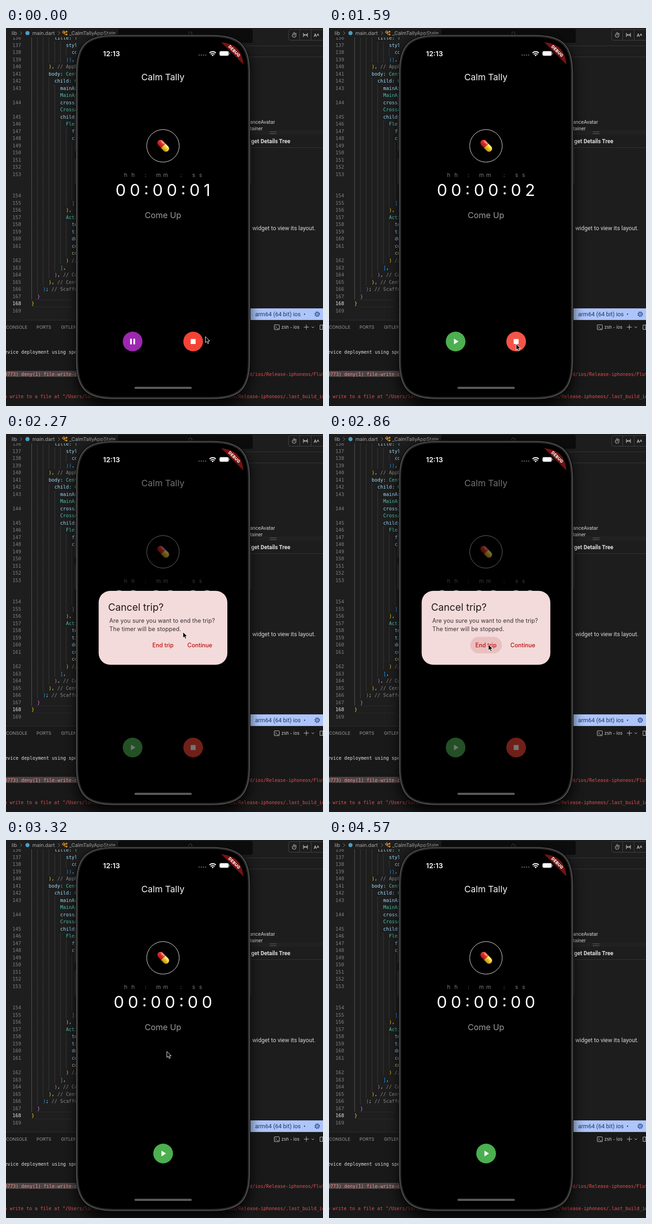
Write an HTML page that moves like this. It is 686 px wide and 817 px high and loops after 4630 ms.

```html
<!DOCTYPE html>
<html lang="en">
<head>
<meta charset="utf-8">
<title>Trip timer</title>
<style>
  html, body { margin: 0; width: 100%; height: 100%; overflow: hidden; background: #1e1e1e; }
  svg { display: block; width: 686px; height: 817px; }
  text { white-space: pre; font-family: Inter, "Open Sans", sans-serif; }
  .mono text { font-family: "DejaVu Sans Mono", monospace; }
  .rob text { font-family: Roboto, sans-serif; }
  .mid { text-anchor: middle; }
  .line { fill: none; stroke-linecap: round; stroke-linejoin: round; }
  #clock { font-feature-settings: "calt" 1; }
</style>
</head>
<body>
<svg viewBox="0 0 686 817" xmlns="http://www.w3.org/2000/svg">
  <defs>
    <filter id="soft" x="-20%" y="-20%" width="140%" height="140%"><feGaussianBlur stdDeviation="13"/></filter>
    <clipPath id="editor"><rect y="20" width="152" height="610"/></clipPath>
    <clipPath id="screen"><path id="glass"/></clipPath>
    <clipPath id="list"><rect x="520" y="190" width="166" height="31"/></clipPath>
    <linearGradient id="red" x2="0" y2="1"><stop stop-color="#ff8a70"/><stop offset=".35" stop-color="#e8372c"/><stop offset="1" stop-color="#a81414"/></linearGradient>
    <linearGradient id="gold" x2="0" y2="1"><stop stop-color="#fff08a"/><stop offset=".4" stop-color="#f3cf32"/><stop offset="1" stop-color="#b98d10"/></linearGradient>
    <path id="play" d="M8 5v14l11-7z"/>
    <path id="pause" d="M6 19h4V5H6zM14 5v14h4V5z"/>
    <path id="stop" d="M6 6h12v12H6z"/>
  </defs>

  <!-- editor -->
  <rect width="686" height="817" fill="#1e1e1e"/>
  <g id="code" class="mono" font-size="10.33" clip-path="url(#editor)"></g>
  <g font-size="10.9" fill="#a9a9a9">
    <text x="12" y="15">lib</text>
    <text x="57" y="15">main.dart</text>
    <text x="137" y="15">_CalmTallyAppState</text>
    <path class="line" stroke="#8a8a8a" d="M31 7.5l3.5 3.5-3.5 3.5M113 7.5l3.5 3.5-3.5 3.5"/>
    <circle cx="46.5" cy="11" r="4.5" fill="#4b9cc4"/>
    <path class="line" stroke="#ee9d28" stroke-width="1.2" d="M122 9l3-3 2.5 2.5-3 3zM126 9.5h3M127 9.5v4.5h2M129.5 8l1.5-1.5 1.5 1.5-1.5 1.5zM129.5 14l1.5-1.5 1.5 1.5-1.5 1.5z"/>
  </g>

  <!-- inspector -->
  <g class="rob">
    <rect x="520" width="166" height="606" fill="#1d1d1d"/>
    <path class="line" stroke="#363636" d="M520 38.5H686M520 62.5H686M520 258.5H686"/>
    <rect x="520" y="221" width="166" height="10" fill="#212121"/>
    <path class="line" stroke="#666" d="M571 224.5h14M571 228.5h14"/>
    <rect x="611.5" y="3.5" width="90" height="23" rx="4" fill="none" stroke="#454545"/>
    <path stroke="#454545" d="M635.5 4v22M660.5 4v22"/>
    <g class="line" stroke="#c4c4c4" stroke-width="1.2">
      <circle cx="623.5" cy="16" r="4"/><path d="M622 10h3M623.5 13.5v2.5M627 11.5l1 1"/>
      <path d="M643.5 11v8M652.5 11v8M645.5 15h5M646.5 13.5l-1.5 1.5 1.5 1.5M649.5 13.5l1.5 1.5-1.5 1.5"/>
    </g>
    <text x="666" y="18.5" font-size="9.5" font-weight="700" fill="#c4c4c4">A<tspan font-size="7.5" dy="-2">A</tspan></text>
    <g clip-path="url(#list)" font-size="10.8" fill="#d6d6d6">
      <text x="528" y="206.5">anceAvatar</text>
      <text x="528" y="221">tainer</text>
    </g>
    <text x="530.5" y="248.5" font-size="12" font-weight="700" fill="#dedede">get Details Tree</text>
    <text x="523" y="436.5" font-size="12.55" fill="#d8d8d8">a widget to view its layout.</text>
    <rect x="520" y="606" width="166" height="25" fill="#adc5fa"/>
    <text x="539" y="623" font-size="12.5" fill="#1e3562">arm64 (64 bit) ios  •</text>
    <g fill="none" stroke="#274b8c">
      <circle cx="673.5" cy="618.5" r="4.8" stroke-width="2.2" stroke-dasharray="2 1.77"/>
      <circle cx="673.5" cy="618.5" r="3.7" stroke-width="1.2"/><circle cx="673.5" cy="618.5" r="1.3"/>
    </g>
  </g>

  <!-- terminal -->
  <rect y="631" width="686" height="186" fill="#191919"/>
  <path stroke="#2e2e2e" d="M0 631.5H686"/>
  <g font-size="9.6" fill="#9a9a9a">
    <text x="0" y="650">CONSOLE</text><text x="66" y="650">PORTS</text><text x="119" y="650">GITLENS</text>
    <text x="596" y="650" fill="#d0d0d0">zsh - ios</text>
  </g>
  <g class="line" stroke="#c8c8c8">
    <rect x="580.5" y="641.5" width="11" height="10.5" rx="1"/><path d="M583 644.5l2.5 2.5-2.5 2.5M587 650h2.5"/>
    <path d="M645 646.5h10M650 641.5v10M661.5 645.5l2.5 2.5 2.5-2.5M690 642h-10.5v9.5h10.5M685 642v9"/>
  </g>
  <g class="mono" font-size="10" fill="#e5504f">
    <text x="-3" y="703.5" fill="#e2e2e2">evice deployment using spe</text>
    <rect y="741" width="160" height="13" fill="#4b4344"/>
    <text x="-3" y="751.5" fill="#f2928f">0773) deny(1) file-write-cr</text>
    <text x="527" y="751.5">d/ios/Release-iphoneos/Flut</text>
    <text x="-4" y="799.5">o write to a file at "/Users/lorkin/</text>
    <text x="479" y="799.5">ios/Release-iphoneos/.last_build_id</text>
  </g>

  <!-- phone -->
  <rect x="152" y="20" width="376" height="802" rx="66" opacity=".75" filter="url(#soft)"/>
  <rect x="243" y="2" width="291" height="30" rx="4" fill="#080808" opacity=".8"/>
  <circle class="line" cx="399" cy="12" r="3.5" stroke="#555" stroke-dasharray="2 1.2"/>
  <path stroke="#2c2c2c" stroke-width="3" d="M150.5 146v22M150.5 192v74M150.5 282v54M528.5 240v96"/>
  <path id="edge" stroke="#090909" stroke-width="2"/>
  <path id="rim" fill="#000" stroke="#2b2b2b" stroke-width="4"/>
  <path id="shine" fill="none" stroke="#686868" stroke-width="1.2"/>

  <g clip-path="url(#screen)">
    <text class="mid" x="339.5" y="113" font-size="19.2" fill="#f4f4f4">Calm Tally</text>
    <circle cx="339.7" cy="254.7" r="35.2" fill="none" stroke="#f0f0f0"/>
    <g transform="translate(340.3 254.6) rotate(46)">
      <path fill="url(#red)" d="M0-6.8H-8.5a6.8 6.8 0 0 0 0 13.6H0z"/>
      <path fill="url(#gold)" d="M0-6.8H8.5a6.8 6.8 0 0 1 0 13.6H0z"/>
      <path class="line" stroke="#fff" stroke-width="1.6" opacity=".55" d="M-9-3.8h6M3-3.8h6"/>
    </g>
    <text class="mid" y="321.5" x="259 275 302 330 345.5 379 406 421" font-size="11.8" fill="#7d7d7d">hh:mm:ss</text>
    <text id="clock" class="mid" x="343.8" y="363.2" font-size="35.6" letter-spacing="8.3" fill="#fff"></text>
    <text class="mid" x="339.7" y="410.7" font-size="17.8" fill="#9c9c9c">Come Up</text>
    <g id="left"><circle r="21.3"/><circle class="glow" r="21.3" fill="#fff"/><use transform="scale(.889) translate(-12 -12)" fill="#fff"/></g>
    <g id="right"><circle r="21.3" fill="#f44336"/><circle class="glow" r="21.3" fill="#fff"/><use href="#stop" transform="scale(.889) translate(-12 -12)" fill="#fff"/></g>
    <rect id="shade" x="160" y="25" width="360" height="770"/>
    <g id="dialog">
      <rect x="200.5" y="339" width="278.5" height="159.7" rx="25" fill="#f3dadb"/>
      <text x="221" y="382" font-size="21.3" fill="#211a1a">Cancel trip?</text>
      <g font-size="12.45" letter-spacing=".13" fill="#3a3031">
        <text x="223.5" y="408">Are you sure you want to end the trip?</text>
        <text x="223.5" y="425.5">The timer will be stopped.</text>
      </g>
      <rect id="hover" x="306" y="438.5" width="68" height="35.5" rx="17.75" fill="#a00c0c"/>
      <g class="mid" font-size="12.45" font-weight="500" fill="#bd100d">
        <text x="339.7" y="461">End trip</text>
        <text x="419.5" y="461">Continue</text>
      </g>
    </g>
    <path fill="#741313" d="M465 30h21l28.5 28.5v21z"/>
    <text class="mid" transform="translate(494.3 49.7) rotate(45)" y="3.3" font-size="8.8" font-weight="800" letter-spacing=".3" fill="#fff">DEBUG</text>
  </g>

  <!-- status bar -->
  <text x="210" y="60.5" font-size="15.1" font-weight="600" fill="#fff">12:13</text>
  <path class="line" stroke="#555" stroke-width="3" stroke-dasharray="0 4.7" d="M418 58.5h15"/>
  <path fill="none" stroke="#fff" stroke-width="2.2" d="M440.5 54a9.5 9.5 0 0 1 13.5 0M443 57a6 6 0 0 1 8.5 0"/>
  <path fill="#fff" d="M447.2 61.2l-2.2-2.4a3.2 3.2 0 0 1 4.4 0z"/>
  <rect x="462" y="50" width="20" height="10" rx="3" fill="#fff" stroke="#777" stroke-width=".8"/>
  <path class="line" stroke="#888" stroke-width="1.4" d="M484 53.5v3"/>
  <rect x="278" y="775.5" width="124" height="4.4" rx="2.2" fill="#5c5c5c"/>

  <path id="cursor" fill="#000" stroke="#fff" stroke-linejoin="round" d="M0 0V13l3-2.8 2.1 4.9 2.3-1-2-4.7h4.1z"/>
</svg>

<script>
const $ = id => document.getElementById(id);
const LOOP = 4630;

// Rectangle with smooth, continuous corners
function slab(id, x, y, w, h, r) {
  const L = 1.3 * r, c = .348 * r, d = L - c;
  $(id).setAttribute('d', `M${x} ${y + L}c0-${d} ${c}-${L} ${L}-${L}h${w - 2 * L}c${d} 0 ${L} ${c} ${L} ${L}` +
    `v${h - 2 * L}c0 ${d}-${c} ${L}-${L} ${L}h-${w - 2 * L}c-${d} 0-${L}-${c}-${L}-${L}z`);
}
slab('edge', 151.5, 15, 376.5, 787, 63);
slab('rim', 154, 17.5, 371.5, 782, 60.5);
slab('shine', 152.5, 16, 374.5, 785, 62);
slab('glass', 165, 30, 349.5, 758, 49);

// Each row: line number, indent level, then colour-keyed pieces
const ink = { p: '#9cdcfe', t: '#4ec9b0', y: '#ffd700', m: '#da70d6', b: '#179fff', c: '#8b8b8b', w: '#d4d4d4', f: '#dcdcaa' };
const rows = `136 4 ptitle:|t Text|b(
137 6 pstyle:|t Te
138 7 pcolor
139 6 b))|w,
140 3 y)|w,|c // AppBar
141 3 pbody:|t Center
142 4 pchild:|t Col
143 5 pmainAxis
- 5 tMainAxis
144 5 pcrossAx
- 5 tCrossAx
145 5 pchildren
146 6 tFlex
147 7 pfl
148 7 pch
149 8
150 8
151 8
152 8
153 8
- 8
- 8
154 8
155 7 b]
156 6 y)|w,
157 6 tActi
158 7 pte
159 7 pti
160 7 pdu
161 7 pco
- 7 fco
162 6 y)|c // A
163 5 b]|w,
164 4 m)|w,|c // Col
165 3 y)|w,|c // Center
166 2 b)|w;|c // Scaffold
167 1 m}
168 0 y}
169 0`.split('\n');

function codeRow(row, i) {
  const [, num, level, body] = row.match(/^(\S+) (\d) ?(.*)$/);
  const mid = 37 + 15.51 * (i - 1), base = mid + 3.7;
  let out = '';
  for (let k = 0; k < level; k++) {
    const x = 55.5 + 12.45 * k;
    out += `<path stroke="${k ? '#3b3b3b' : '#5a5a5a'}" d="M${x} ${mid - 7.8}v15.6"/>`;
  }
  if (num === '168') out += `<path stroke="#2d2d2d" d="M62 ${mid - 7.5}h80M62 ${mid + 7.5}h80"/>`;
  if (num !== '-') out += `<text x="14" y="${base}" fill="${num === '168' ? '#e8e8e8' : '#7e8084'}">${num}</text>`;
  const parts = body ? body.split('|').map(s => `<tspan fill="${ink[s[0]]}">${s.slice(1)}</tspan>`) : [];
  return out + `<text x="${55 + 12.45 * level}" y="${base}">${parts.join('')}</text>`;
}
$('code').innerHTML = rows.map(codeRow).join('');

// Pointer path: time, x, y
const path = [
  [0, 431.5, 667], [80, 431.5, 667], [540, 274, 682], [820, 272.5, 680.5], [960, 272.5, 680.5],
  [1120, 362, 681], [1280, 405, 683], [1700, 405, 683], [2210, 410, 424], [2270, 383, 428],
  [2480, 345, 455], [3300, 345, 455], [3320, 348, 457], [3460, 500, 774], [3640, 512, 800], [3700, 516, 835]
];

const ramp = (t, a, b) => Math.min(1, Math.max(0, (t - a) / (b - a)));
const smooth = k => k * k * (3 - 2 * k);

function pointer(t) {
  const i = path.findIndex(p => p[0] > t);
  if (i < 0) return [-50, -50];
  const [a, x, y] = path[i - 1], [b, u, v] = path[i];
  const k = smooth(ramp(t, a, b));
  return [x + (u - x) * k, y + (v - y) * k];
}

// Hover light plus a short press flash
function glow(t, from, to, press) {
  const hover = .05 * (ramp(t, from, from + 60) - ramp(t, to, to + 60));
  return hover + .06 * (ramp(t, press, press + 80) - ramp(t, press + 180, press + 380));
}

function place(id, x, light) {
  $(id).setAttribute('transform', `translate(${x} 677.6)`);
  $(id).querySelector('.glow').setAttribute('opacity', light);
}

function draw(t) {
  const ended = t >= 2870, paused = t >= 690;
  $('clock').textContent = '00:00:0' + (ended ? 0 : t < 330 ? 1 : 2);

  place('left', ended ? 340 : 274, ended ? 0 : glow(t, 490, 990, 660));
  place('right', 405, glow(t, 1200, 1720, 1540));
  $('left').firstElementChild.setAttribute('fill', paused ? '#4caf50' : '#9c27b0');
  $('left').querySelector('use').setAttribute('href', paused ? '#play' : '#pause');
  $('right').style.display = ended ? 'none' : '';

  const show = ramp(t, 1640, 1730), hide = ramp(t, 2940, 3050);
  $('shade').setAttribute('opacity', .54 * show * (1 - hide ** 1.6));
  $('dialog').setAttribute('opacity', show * (1 - hide));
  $('hover').setAttribute('opacity', .19 * ramp(t, 2780, 2900));

  $('cursor').setAttribute('transform', `translate(${pointer(t)})`);
}

const start = performance.now();
function tick() {
  draw((performance.now() - start) % LOOP);
  requestAnimationFrame(tick);
}
tick();
</script>
</body>
</html>
```
